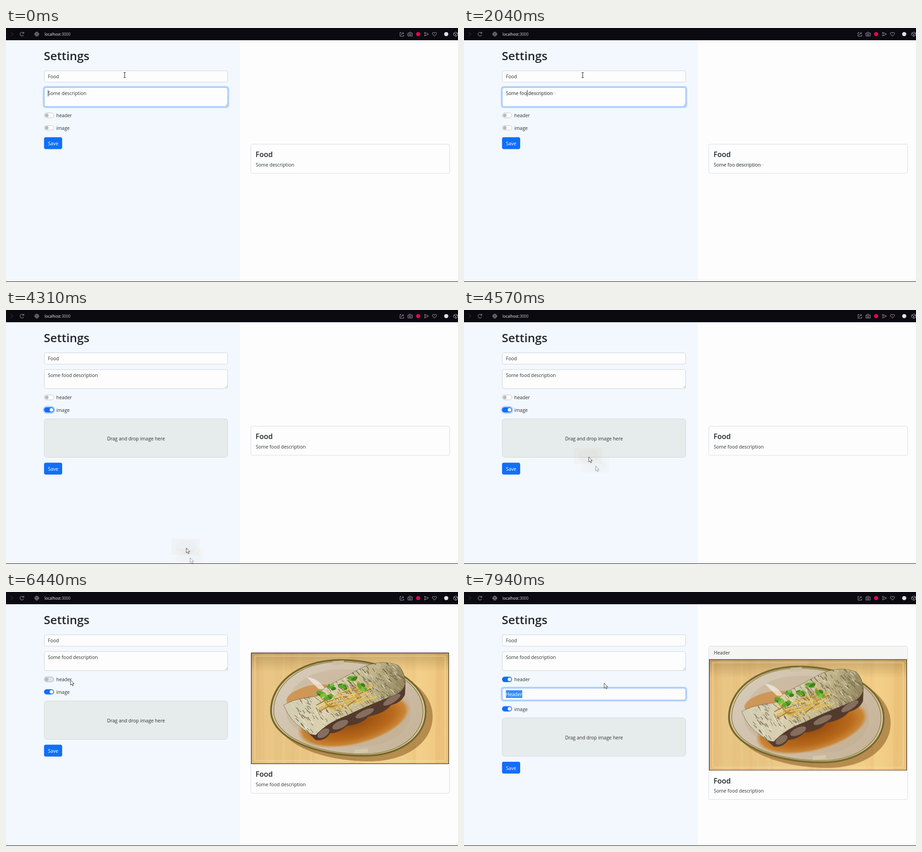
Write an HTML page that moves like this. It is 998 px wide and 561 px high and loops after 8 s.

```html
<!DOCTYPE html>
<html lang="en">
<head>
<meta charset="utf-8">
<title>Card settings</title>
<style>
html, body { margin: 0; width: 100%; height: 100%; overflow: hidden; background: #fdfdfd; }
svg { display: block; }
text { font: 10.45px "Open Sans", "Noto Sans", sans-serif; fill: #2b2f33; white-space: pre; }
.h1 { font-size: 26px; font-weight: 600; fill: #212529; }
.h5 { font-size: 16px; font-weight: 600; fill: #212529; }
.url { font-size: 8.5px; fill: #fff; }
.light { fill: #fff; }
.field { fill: #fdfdfd; stroke: #ced4da; }
.ring { fill: none; stroke: #0d6efd; stroke-opacity: .25; stroke-width: 3; }
.edge { fill: none; stroke: #86b7fe; }
.icon { fill: none; stroke: #aaa6b8; stroke-width: 1; }
.plate { transform-origin: 756px 256px; }

/* one shared 8 s clock; 1% = 80 ms */
.step { animation: 8s step-end infinite; }
.ease { animation: 8s linear infinite; }

.imageOn { animation-name: imageOn; }
.imageRing { animation-name: imageRing; }
.headerOn { animation-name: headerOn; }
.headerRing { animation-name: headerRing; }
.press { animation-name: press; }
.photoOn { animation-name: photoOn; }
.selected { animation-name: selected; }
.row { animation-name: row; }
.save { animation-name: save; }
.body { animation-name: body; }
.frame { animation-name: frame; }
.photoY { animation-name: photoY; }
.descFocus { animation-name: descFocus; }
.headFocus { animation-name: headFocus; }
.imageKnob { animation-name: imageKnob; }
.headerKnob { animation-name: headerKnob; }
.arrow { animation-name: arrow; }
.beam { animation-name: beam; }
.mouse { animation-name: mouse; }
.lag { animation: mouse 8s linear -7.967s infinite, trail 8s step-end infinite; }
.thumb { animation-name: thumb; }

@keyframes imageOn { 0% { opacity: 0 } 41.625%, 100% { opacity: 1 } }
@keyframes imageRing { 0% { opacity: 0 } 41.625% { opacity: 1 } 80%, 100% { opacity: 0 } }
@keyframes headerOn { 0% { opacity: 0 } 81.5%, 100% { opacity: 1 } }
@keyframes headerRing { 0% { opacity: 0 } 81.5% { opacity: 1 } 96.125%, 100% { opacity: 0 } }
@keyframes press { 0% { opacity: 0 } 80% { opacity: 1 } 81.5%, 100% { opacity: 0 } }
@keyframes photoOn { 0% { opacity: 0 } 61.375%, 100% { opacity: 1 } }
@keyframes selected { 0% { opacity: 0 } 96.5%, 100% { opacity: 1 } }
@keyframes row { 0% { transform: none } 81.5%, 100% { transform: translateY(37.5px) } }
@keyframes save {
  0% { transform: none }
  41.625% { transform: translateY(96px) }
  81.5%, 100% { transform: translateY(133.5px) }
}
@keyframes body {
  0% { transform: none }
  61.375% { transform: translateY(123px) }
  81.5%, 100% { transform: translateY(137.5px) }
}
@keyframes frame {
  0% { y: 256.5px; height: 64.5px }
  61.375% { y: 133.5px; height: 311px }
  81.5%, 100% { y: 119.5px; height: 339px }
}
@keyframes photoY { 0% { transform: none } 81.5%, 100% { transform: translateY(14.5px) } }
@keyframes descFocus { 0%, 40.875% { opacity: 1 } 41.6%, 100% { opacity: 0 } }
@keyframes headFocus { 0%, 96.125% { opacity: 0 } 98%, 100% { opacity: 1 } }
@keyframes imageKnob {
  0%, 41.7% { transform: none; animation-timing-function: ease-in-out }
  43.5%, 100% { transform: translateX(10.5px) }
}
@keyframes headerKnob {
  0%, 81.5% { transform: none; animation-timing-function: ease-in-out }
  83.4%, 100% { transform: translateX(10.5px) }
}
@keyframes arrow {
  0% { opacity: 0 } 36.9% { opacity: 1 } 58.9% { opacity: 0 }
  76.6% { opacity: 1 } 91.9% { opacity: 0 } 98.1%, 100% { opacity: 1 }
}
@keyframes beam {
  0% { opacity: 1 } 36.9% { opacity: 0 } 58.9% { opacity: 1 }
  76.6% { opacity: 0 } 91.9% { opacity: 1 } 98.1%, 100% { opacity: 0 }
}
@keyframes mouse {
  0%, 30.6% { transform: translate(262px, 104px); animation-timing-function: ease-in-out }
  39.4% { transform: translate(123px, 221px) }
  43.5% { transform: translate(123px, 221px); animation-timing-function: ease-in }
  50.6% { transform: translate(400px, 575px) }
  53.125% { transform: translate(413px, 565px) }
  53.875% { transform: translate(398px, 526px) }
  56.25% { transform: translate(310px, 370px); animation-timing-function: ease-out }
  58.75% { transform: translate(242px, 281px) }
  75.6% { transform: translate(242px, 281px); animation-timing-function: ease-in-out }
  80% { transform: translate(142px, 194px) }
  83.75% { transform: translate(142px, 194px); animation-timing-function: ease-in-out }
  93.75% { transform: translate(300px, 225px) }
  96.5% { transform: translate(300px, 225px); animation-timing-function: ease-in-out }
  99%, 100% { transform: translate(309px, 201px) }
}
@keyframes trail { 0% { opacity: 0 } 30% { opacity: .55 } 99.1%, 100% { opacity: 0 } }
@keyframes thumb { 0% { opacity: 0 } 53.125% { opacity: .07 } 58.8%, 100% { opacity: 0 } }
</style>
</head>
<body>
<svg width="998" height="561" viewBox="0 0 998 561">
  <defs>
    <linearGradient id="wood">
      <stop offset="0" stop-color="#e8c583"/><stop offset=".45" stop-color="#ecca8a"/>
      <stop offset=".85" stop-color="#f3d089"/><stop offset="1" stop-color="#eec47b"/>
    </linearGradient>
    <linearGradient id="shade" x2="0" y2="1">
      <stop offset="0" stop-color="#6b4a1c" stop-opacity=".3"/><stop offset="1" stop-color="#6b4a1c" stop-opacity="0"/>
    </linearGradient>
    <linearGradient id="china" x2="1" y2=".6">
      <stop offset="0" stop-color="#d8ccbb"/><stop offset="1" stop-color="#c8b69c"/>
    </linearGradient>
    <radialGradient id="sauce">
      <stop offset="0" stop-color="#8f470c"/><stop offset=".7" stop-color="#b8691b"/>
      <stop offset=".92" stop-color="#c98535"/><stop offset="1" stop-color="#cf9a58" stop-opacity=".2"/>
    </radialGradient>
    <linearGradient id="skin" x2="1" y2=".1">
      <stop offset="0" stop-color="#d3ccb4"/><stop offset=".4" stop-color="#d9d0b0"/>
      <stop offset=".75" stop-color="#c0b48a"/><stop offset="1" stop-color="#95885f"/>
    </linearGradient>
    <path id="oval" d="M583 262C583 205 640 149 738 149C850 149 929 200 929 264C929 322 870 363 790 363C680 363 583 322 583 262Z"/>
    <path id="fillet" d="M613 250Q634 236 686 230L704 211L790 165Q830 148 866 162Q880 175 882 200Q880 216 862 226Q800 250 750 274Q710 288 684 316Q668 316 655 302Q628 286 613 250Z"/>
    <clipPath id="filletClip"><use href="#fillet"/></clipPath>
    <clipPath id="photoClip"><rect x="541" y="134" width="437" height="246"/></clipPath>
  </defs>

  <!-- page -->
  <rect width="998" height="561" fill="#fdfdfd"/>
  <rect width="516" height="561" fill="#f2f8fd"/>

  <!-- browser bar -->
  <rect width="998" height="27" fill="#0c0a11"/>
  <g class="icon">
    <path d="M11 9.5L15 13.5L11 17.5" stroke="#4b4856"/>
    <path d="M38.6 11A4.2 4.2 0 1 0 39.2 15M39.4 8.8V11.6H36.4"/>
    <circle cx="68" cy="13.5" r="4.4"/>
    <path d="M63.6 13.5H72.4M68 9.1Q64 13.5 68 17.9Q72 13.5 68 9.1"/>
    <path d="M873 10H870V18H878V15M873 15Q873 11.5 877.5 11.5M875.5 9L878 11.5L875.5 14"/>
    <path d="M887.5 11H890L891 9.3H893.5L894.5 11H897V17.7H887.5Z"/>
    <circle cx="892.2" cy="14" r="1.9"/>
    <path d="M924 9.5L933 13.5L924 17.5L925.5 13.5Z"/>
    <path d="M946 18L941.8 13.6Q940.6 10 943.6 9.6Q945.3 9.6 946 11.2Q946.7 9.6 948.4 9.6Q951.4 10 950.2 13.6Z"/>
    <path d="M993 9L997.5 11.2V16L993 18.4L988.5 16V11.2ZM988.5 11.2L993 13.5L997.5 11.2M993 13.5V18.4"/>
  </g>
  <circle cx="910" cy="13.5" r="4.6" fill="#e4064f"/>
  <circle cx="972" cy="13.5" r="4.6" fill="#dfe1ea"/>
  <text class="url" x="85" y="17">localhost<tspan fill="#c6c3cf">:3000</tspan></text>

  <!-- form -->
  <text class="h1" x="83.5" y="71">Settings</text>
  <rect class="field" x="84.5" y="94.5" width="405" height="25" rx="4"/>
  <text x="92.5" y="111">Food</text>

  <rect class="field" x="84.5" y="131.5" width="405" height="42" rx="4"/>
  <path d="M484 172L489 167M487 172L489 170" stroke="#8b9095" stroke-width=".8"/>
  <g class="ease descFocus">
    <rect class="ring" x="82.7" y="129.7" width="408.6" height="45.6" rx="5"/>
    <rect class="edge" x="84.5" y="131.5" width="405" height="42" rx="4"/>
  </g>
  <text class="desc" x="92.5" y="148"></text>
  <text class="next" x="92.5" y="148" opacity=".2"></text>
  <rect id="caret" y="137" width="1" height="14" fill="#222"/>

  <g>
    <rect x="84.5" y="187.5" width="21" height="11" rx="5.5" fill="#fdfdfd" stroke="#c2c4c6"/>
    <rect class="step press" x="84.5" y="187.5" width="21" height="11" rx="5.5" fill="#e1e3e4" stroke="#b0b2b4"/>
    <circle cx="90" cy="193" r="3.9" fill="#bababa"/>
    <rect class="ring step headerRing" x="82.7" y="185.7" width="24.6" height="14.6" rx="7.3"/>
    <g class="step headerOn">
      <rect x="84" y="187" width="22" height="12" rx="6" fill="#0d6efd"/>
      <circle class="ease headerKnob" cx="90" cy="193" r="3.9" fill="#fff"/>
    </g>
    <text x="111" y="197">header</text>
  </g>

  <g class="step headerOn">
    <rect class="field" x="84.5" y="212.5" width="405" height="26" rx="4"/>
    <g class="ease headFocus">
      <rect class="ring" x="82.7" y="210.7" width="408.6" height="29.6" rx="5"/>
      <rect class="edge" x="84.5" y="212.5" width="405" height="26" rx="4"/>
    </g>
    <text x="92.5" y="230">Header</text>
    <g class="step selected">
      <rect x="92.5" y="217" width="36" height="17" fill="#3390f8"/>
      <text class="light" x="92.5" y="230">Header</text>
    </g>
  </g>

  <g class="step row">
    <rect x="84.5" y="215.5" width="21" height="10" rx="5" fill="#fdfdfd" stroke="#c2c4c6"/>
    <circle cx="90" cy="220.5" r="3.9" fill="#bababa"/>
    <rect class="ring step imageRing" x="82.7" y="213.2" width="24.6" height="14.6" rx="7.3"/>
    <g class="step imageOn">
      <rect x="84" y="214.7" width="22" height="11.6" rx="5.8" fill="#0d6efd"/>
      <circle class="ease imageKnob" cx="90" cy="220.5" r="3.9" fill="#fff"/>
      <rect x="84.5" y="240.5" width="405" height="85" rx="6" fill="#e6ebeb" stroke="#d0d7da"/>
      <text x="287" y="288" text-anchor="middle">Drag and drop image here</text>
    </g>
    <text x="111" y="225">image</text>
  </g>

  <g class="step save">
    <rect x="84" y="241.3" width="40" height="26.2" rx="4" fill="#116ff8"/>
    <text class="light" x="104" y="259" text-anchor="middle">Save</text>
  </g>

  <!-- preview card -->
  <rect class="step frame" x="540.5" width="439" rx="4" fill="#fdfdfd" stroke="#d9daea"/>
  <g class="step headerOn">
    <path d="M541 148V123Q541 120 544 120H976Q979 120 979 123V148Z" fill="#f5f6f4"/>
    <text x="551.5" y="138">Header</text>
  </g>
  <g class="step body">
    <text class="h5" x="551" y="285">Food</text>
    <text class="desc" x="551.5" y="305.5"></text>
    <text class="next" x="551.5" y="305.5" opacity=".2"></text>
  </g>

  <g class="step photoOn"><g class="step photoY"><g clip-path="url(#photoClip)">
    <rect x="541" y="134" width="437" height="246" fill="url(#wood)"/>
    <g id="grain" stroke="#c98f43" stroke-opacity=".06"></g>
    <rect x="541" y="134" width="437" height="42" fill="url(#shade)"/>
    <rect x="549.5" y="141.5" width="420" height="231" fill="none" stroke="#f5e6ac" stroke-opacity=".5" stroke-width="2"/>
    <rect x="541.5" y="134.5" width="436" height="245" fill="none" stroke="#3a3020" stroke-width="1.5"/>
    <use href="#oval" x="13" y="11" fill="#8f6128" opacity=".6"/>
    <use href="#oval" fill="#d9ccb0"/>
    <use href="#oval" class="plate" transform="scale(.988)" fill="#d6c8ab" stroke="#74662a" stroke-width="4"/>
    <use href="#oval" class="plate" transform="scale(.953)" fill="url(#china)" stroke="#8f7f38" stroke-width="1.6"/>
    <use href="#oval" class="plate" transform="scale(.8)" fill="#bfa98b" opacity=".35"/>
    <ellipse cx="672" cy="228" rx="54" ry="21" fill="#cf8a3e" opacity=".75" transform="rotate(-14 672 228)"/>
    <ellipse cx="768" cy="284" rx="126" ry="53" fill="url(#sauce)" transform="rotate(-14 768 284)"/>
    <path d="M664 188Q690 190 706 216L690 214Z" fill="#f3ece2" opacity=".75"/>
    <rect x="721" y="152" width="25" height="9" fill="#cbbfa0" transform="rotate(-5 733 156)"/>
    <rect x="770" y="347" width="29" height="8" fill="#d5c9ab" transform="rotate(-6 784 351)"/>
    <path d="M668 312Q700 284 750 266Q820 246 882 204L881 226Q874 244 850 250Q836 268 800 275Q786 292 752 296Q735 312 716 312Q704 330 684 327Z" fill="#533a2d"/>
    <g fill="#96806f" opacity=".75">
      <ellipse cx="701" cy="312" rx="15" ry="8" transform="rotate(-35 701 312)"/>
      <ellipse cx="738" cy="293" rx="19" ry="8" transform="rotate(-25 738 293)"/>
      <ellipse cx="792" cy="268" rx="22" ry="7" transform="rotate(-25 792 268)"/>
      <ellipse cx="852" cy="238" rx="22" ry="7" transform="rotate(-32 852 238)"/>
    </g>
    <use href="#fillet" fill="url(#skin)" stroke="#4a3c28" stroke-opacity=".6"/>
    <g id="scales" clip-path="url(#filletClip)" fill="none" stroke-opacity=".6"></g>
    <g id="ginger" stroke-linecap="round"></g>
    <g id="herbs"></g>
  </g></g></g>

  <!-- pointer -->
  <g id="mouse" class="ease mouse">
    <g class="step thumb">
      <rect x="-32" y="-20" width="62" height="36" fill="#d8b878"/>
      <ellipse cy="-2" rx="24" ry="14" fill="#9c8a6a"/>
    </g>
    <path class="step arrow" d="M.5 .5V11.5L3 9.2L4.8 13.2L6.7 12.4L5 8.5H8.3Z" fill="#fff" stroke="#333" stroke-width=".9"/>
    <path class="step beam" d="M-2.5 -5.5H-.7L0 -5L.7 -5.5H2.5M0 -5V5M-2.5 5.5H-.7L0 5L.7 5.5H2.5" fill="none" stroke="#222" stroke-width="1.1"/>
  </g>
  <rect y="560" width="998" height="1" fill="#0a0a0c"/>
</svg>

<script>
const LOOP = 8000, BLEND = 35;
const find = id => document.getElementById(id);
const all = name => [...document.querySelectorAll(name)];

// seeded random for the dish
let seed = 11;
const rnd = (lo, hi) => {
  seed = (seed * 16807) % 2147483647;
  return lo + (hi - lo) * seed / 2147483647;
};
const add = (id, tag, attrs) => {
  const el = document.createElementNS("http://www.w3.org/2000/svg", tag);
  for (const key in attrs) el.setAttribute(key, attrs[key]);
  find(id).append(el);
};

for (let i = 0; i < 16; i++) {
  const x = rnd(541, 978);
  add("grain", "path", { d: `M${x} 134L${x + rnd(-6, 6)} 380`, "stroke-width": rnd(6, 24) });
}
const skins = ["#494330", "#f1ecda", "#5c5236"];
for (let i = 0; i < 480; i++) {
  const along = rnd(0, 1), across = rnd(-48, 48);
  const x = 635 + along * 245 + across * .35, y = 272 - along * 88 + across;
  add("scales", "path", {
    d: `M${x} ${y}q${rnd(1, 4)} ${rnd(0, 3)} ${rnd(4, 9)} ${rnd(4, 9)}`,
    stroke: skins[i % 3], "stroke-width": rnd(.6, 2)
  });
}
const tones = ["#d3a640", "#e8cd78", "#a8782a", "#ddb95c"];
for (let i = 0; i < 60; i++) {
  const x = rnd(700, 796), y = 240 - (x - 700) * .22 + rnd(-18, 20);
  const turn = i % 3 ? rnd(-.65, -.1) : rnd(.5, 1.1), half = rnd(12, 25);
  const dx = Math.cos(turn) * half, dy = Math.sin(turn) * half;
  add("ginger", "path", { d: `M${x - dx} ${y - dy}L${x + dx} ${y + dy}`, stroke: tones[i % 4], "stroke-width": rnd(1.3, 2.4) });
}
for (const [cx, cy] of [[695, 223], [712, 230], [719, 209], [743, 206], [765, 190], [786, 210]]) {
  for (let i = 0; i < 5; i++) {
    const x = cx + rnd(-6, 6), y = cy + rnd(-5, 5);
    add("herbs", "ellipse", {
      cx: x, cy: y, rx: rnd(5, 8), ry: rnd(3, 5),
      fill: ["#3f7d1f", "#5fa62f", "#7cc23f"][i % 3], transform: `rotate(${rnd(-60, 60)} ${x} ${y})`
    });
  }
}

// faint trailing copy of the pointer while it moves
const trail = find("mouse").cloneNode(true);
trail.removeAttribute("id");
trail.setAttribute("class", "lag");
find("mouse").before(trail);

// typing
const moves = [120, 280, 440, 600];
const types = [880, 1180, 1520, 1800, 2070];
const count = (list, t) => list.filter(k => k <= t).length;
const line = t => "Some" + " food".slice(0, count(types, t)) + " description";
const now = all(".desc"), next = all(".next"), caret = find("caret");

function draw(t) {
  const text = line(t), soon = line(t + BLEND);
  now.forEach(el => el.textContent = text);
  next.forEach(el => el.textContent = soon === text ? "" : soon);
  const pos = count(moves, t) + count(types, t);
  const last = [0, ...moves, ...types].filter(k => k <= t).pop();
  caret.setAttribute("x", 92.5 + (pos ? now[0].getSubStringLength(0, pos) : 0));
  caret.setAttribute("opacity", t < 3270 && (t - last) % 1060 < 530 ? 1 : 0);
}

let start;
function tick(time) {
  start ??= time;
  draw((time - start) % LOOP);
  requestAnimationFrame(tick);
}
draw(0);
requestAnimationFrame(tick);
</script>
</body>
</html>
```
